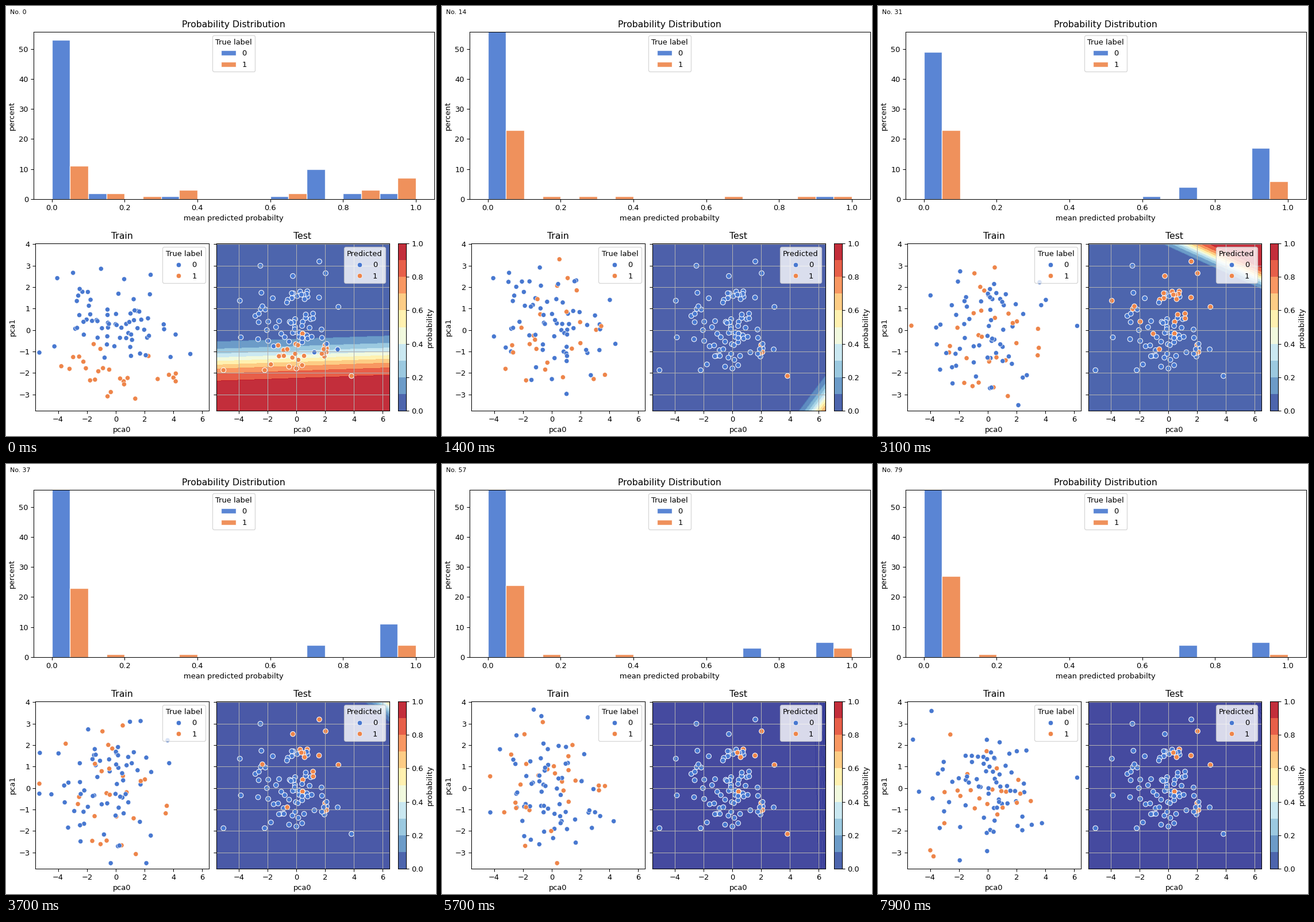
These frames come from a looping animation (748 by 748 pixels, 8000 ms). A matplotlib script:

```python
import numpy as np
import matplotlib.pyplot as plt
from matplotlib.animation import FuncAnimation
from matplotlib.lines import Line2D
from matplotlib.patches import Patch

SIZE, DPI, FRAMES, INTERVAL = 748, 93.5, 80, 100
COLORS = np.array(["#4878d0", "#ee854a"])
XLIM, YLIM = (-5.58, 6.46), (-3.76, 4.04)

# Classifier at a few moments: step; boundary direction in degrees, distance
# and steepness; percent in the lowest and highest bin for labels 0 and 1
STATES = np.array([
    (0, -88.7, 1.33, 2.4, 53, 2, 11, 7),
    (14, -48.4, 6.74, 2.9, 70, 1, 23, 1),
    (31, 73, 4.21, 4.7, 49, 17, 23, 6),
    (45, 45, 9.7, 2.6, 66, 4, 24, 2),
    (57, 2, 8.17, 3, 63, 5, 24, 3),
    (71, 30.5, 5.83, 6, 62, 7, 27, 2),
    (79, 42, 9.6, 3.8, 62, 5, 27, 1),
])
LABEL_TOTALS = (71, 29)
SLOTS, LIFETIME = 95, 20

rng = np.random.default_rng(12)

# Test set: a few outer points around a filled ellipse
OUTER = [(-5.07, -1.87), (-2.5, 3), (1.6, 3.2), (3.84, -2.14), (2.04, 2.65),
         (2.93, 1.08), (-3.93, 1.37), (-3.86, -.34), (-.24, 2.52),
         (2.88, -.9), (-2.2, -1.87), (-2.43, 1.74)]
angle = rng.uniform(0, 2 * np.pi, 83)
radius = rng.random(83) ** .55
TEST = np.vstack([OUTER, np.column_stack([2.8 * radius * np.cos(angle) - .2,
                                          2.1 * radius * np.sin(angle)])])
HIDDEN = rng.normal(0, .3, len(TEST))

# Order in which samples fill the middle bins, favouring the outer ones
ENDS_FIRST = np.array([5, 3, 2, 1, 1, 2, 3, 3]) / 20
FILL_ORDER = [rng.choice(np.arange(1, 9), 40, p=ENDS_FIRST) for _ in COLORS]


def state_at(step):
    return [np.interp(step, STATES[:, 0], col) for col in STATES[:, 1:].T]


def bin_heights(label, low, high):
    low, high = round(low), round(high)
    middle = max(LABEL_TOTALS[label] - low - high, 0)
    heights = np.bincount(FILL_ORDER[label][:middle], minlength=10)
    heights[[0, 9]] = low, high
    return heights


def sample(slot, generation):
    """A training sample; early labels depend on height, later ones do not."""
    draw = np.random.default_rng([slot, generation, 11])
    x = np.clip(draw.normal(0, 2), -5.3, 6.2)
    y = np.clip(draw.normal(0, 1.45), -3.5, 3.7)
    chance = .27 if generation else 1 / (1 + np.exp(4 * (y + 1.1)))
    return x, y, draw.random() < chance


def train_samples(step):
    data = np.array([sample(s, (step + s * 7 % LIFETIME) // LIFETIME)
                     for s in range(SLOTS)])
    return data[:, :2], data[:, 2].astype(int)


def predict(direction, distance, count):
    """Mark the points furthest along the direction, allowing for hidden traits."""
    score = TEST @ direction + HIDDEN * distance
    labels = np.zeros(len(TEST), int)
    labels[np.argsort(-score)[:count]] = 1
    return labels


fig = plt.figure(figsize=(SIZE / DPI, SIZE / DPI), dpi=DPI)


def add_axes(left, top, right, bottom):
    box = [left, SIZE - bottom, right - left, bottom - top]
    return fig.add_axes([v / SIZE for v in box])


def dot_legend(ax, title):
    dots = [Line2D([], [], marker="o", ls="", ms=6.5, mfc=c, mec="w", mew=.5)
            for c in COLORS]
    ax.legend(dots, ["0", "1"], title=title, loc="upper right")


counter = fig.text(7 / SIZE, 1 - 13.5 / SIZE, "", fontsize="small")

hist = add_axes(48, 45, 744.5, 336)
hist.set(xlim=(-.05, 1.05), ylim=(0, 55.65), title="Probability Distribution",
         xlabel="mean predicted probabilty", ylabel="percent")
hist.set_yticks(range(0, 51, 10))
bars = [hist.bar(np.arange(10) / 10 + k * .05, np.zeros(10), .05, align="edge",
                 color=COLORS[k], alpha=.9, edgecolor="w", linewidth=1)
        for k in (0, 1)]
hist.legend([Patch(fc=c, ec="w", alpha=.9) for c in COLORS], ["0", "1"],
            title="True label", loc="upper center")

train = add_axes(51, 413, 353, 704)
test = add_axes(365.5, 413, 666.5, 704)
for ax, title in ((train, "Train"), (test, "Test")):
    ax.set(xlim=XLIM, ylim=YLIM, title=title, xlabel="pca0",
           xticks=range(-4, 7, 2), yticks=range(-3, 5))
train.set_ylabel("pca1")
test.tick_params(labelleft=False)
test.grid(True)
dot_legend(train, "True label")
dot_legend(test, "Predicted")
train_dots = train.scatter([], [], s=40, edgecolors="w", linewidths=.5)
test_dots = test.scatter(*TEST.T, s=44, edgecolors="w", linewidths=.8)

scale = add_axes(682, 413, 696, 704)
scale.pcolormesh([0, 1], np.linspace(0, 1, 11), np.arange(.05, 1, .1)[:, None],
                 cmap="RdYlBu_r", vmin=0, vmax=1, alpha=.9)
scale.set(xticks=[], yticks=np.linspace(0, 1, 6), ylim=(0, 1))
scale.yaxis.tick_right()
scale.yaxis.set_label_position("right")
scale.set_ylabel("probability")

grid_x, grid_y = np.meshgrid(np.linspace(*XLIM, 120), np.linspace(*YLIM, 120))
surface = []


def update(step):
    counter.set_text(f"No. {step}")
    degrees, distance, steepness, *ends = state_at(step)
    direction = np.array([np.cos(np.radians(degrees)), np.sin(np.radians(degrees))])

    positives = 0
    for label, group in enumerate(bars):
        heights = bin_heights(label, *ends[2 * label:2 * label + 2])
        positives += heights[5:].sum()
        for bar, height in zip(group, heights):
            bar.set_height(height)

    points, labels = train_samples(step)
    train_dots.set_offsets(points)
    train_dots.set_facecolor(COLORS[labels])
    test_dots.set_facecolor(COLORS[predict(direction, distance, positives)])

    while surface:
        surface.pop().remove()
    reach = direction[0] * grid_x + direction[1] * grid_y - distance
    prob = 1 / (1 + np.exp(-steepness * reach))
    surface.append(test.contourf(grid_x, grid_y, prob, 10, cmap="RdYlBu_r",
                                 vmin=0, vmax=1, alpha=.9, zorder=0))


anim = FuncAnimation(fig, update, frames=FRAMES, interval=INTERVAL,
                     repeat=True, repeat_delay=0, blit=False)
plt.show()
```
